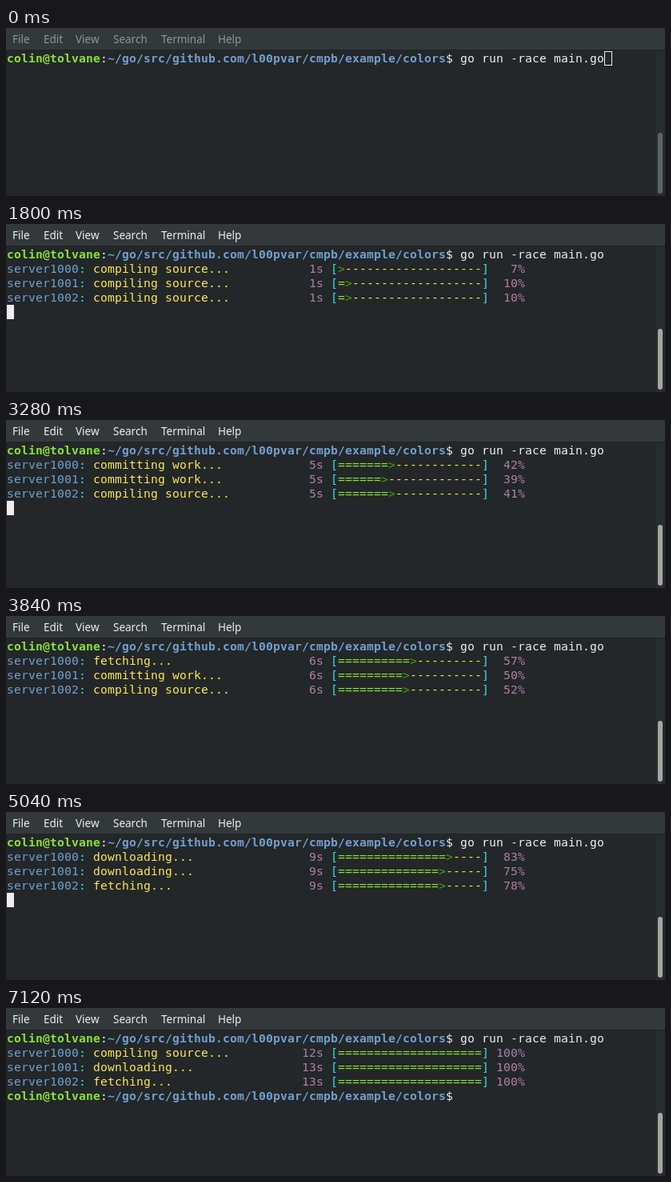
These frames come from a looping animation (824 px wide and 210 px high, 7.4 s). An HTML page with a canvas:

```html
<!DOCTYPE html>
<html lang="en">
<head>
<meta charset="utf-8">
<title>Terminal progress bars</title>
<style>
  html, body { margin: 0; width: 100%; height: 100%; overflow: hidden; background: #232729; }
  canvas { display: block; width: 824px; height: 210px; }
</style>
</head>
<body>
<canvas id="stage" width="824" height="210"></canvas>
<script>
const ctx = document.getElementById('stage').getContext('2d');
const LOOP = 7400, START = 1320, SPEED = 2.45;
const CELL = 9, LINE = 18, LEFT = 1, TOP = 29;
const MONO = '14.667px "DejaVu Sans Mono", monospace';

const C = {
  bg: '#232729', white: '#eeeeec', green: '#8ae234', darkGreen: '#4e9a06',
  blue: '#729fcf', cyan: '#34e2e2', yellow: '#fce94f', purple: '#ad7fa8'
};

const MENU = [['File', 8], ['Edit', 47], ['View', 87], ['Search', 134], ['Terminal', 194], ['Help', 265]];

const [FETCH, LOAD, BUILD, COMMIT] =
  ['fetching...', 'downloading...', 'compiling source...', 'committing work...'];

// Each bar passes through [time, percent, message]
const BARS = [
  [[1300, 0, BUILD], [1800, 7, BUILD], [2760, 29, COMMIT], [3840, 57, FETCH], [5040, 83, LOAD], [5840, 99, COMMIT], [6160, 100, BUILD]],
  [[1300, 0, BUILD], [1800, 10, BUILD], [2760, 30, COMMIT], [3840, 50, COMMIT], [5040, 75, LOAD], [5840, 87, COMMIT], [6480, 100, LOAD]],
  [[1300, 0, BUILD], [1800, 10, BUILD], [2760, 32, BUILD], [3840, 52, BUILD], [5040, 78, FETCH], [5840, 91, BUILD], [6480, 100, FETCH]]
];

function mix(a, b, k) {
  return `rgb(${a.map((v, i) => Math.round(v + (b[i] - v) * k)).join(',')})`;
}

// Writes on the character grid and returns the next column
function put(text, col, row, color, bold = false) {
  ctx.font = (bold ? 'bold ' : '') + MONO;
  ctx.fillStyle = color;
  for (const ch of text) {
    if (ch !== ' ') ctx.fillText(ch, LEFT + col * CELL, TOP + row * LINE + 14);
    col++;
  }
  return col;
}

function prompt(row) {
  let col = put('colin@tolvane', 0, row, C.green, true);
  col = put(':', col, row, C.white);
  col = put('~/go/src/github.com/l00pvar/cmpb/example/colors', col, row, C.blue, true);
  return put('$ ', col, row, C.white);
}

function cursor(col, row, hollow = false) {
  const x = LEFT + col * CELL, y = TOP + row * LINE;
  if (hollow) {
    ctx.strokeStyle = C.white;
    ctx.lineWidth = 1;
    ctx.strokeRect(x + 0.5, y + 0.5, CELL, LINE - 1);
  } else {
    ctx.fillStyle = C.white;
    ctx.fillRect(x, y, CELL, LINE);
  }
}

// Screen refreshes come in uneven beats
function lastRefresh(t) {
  if (t >= 5520) return Math.min(6480, t - (t - 5520) % 160);
  if (t >= 2760 && t < 2880) return 2760;
  const d = (t - (t < 2760 ? START : 2800)) % 240;
  return t - d + (d >= 80 ? 80 : 0);
}

function cursorOn(t) {
  if (t < 840) return true;
  if (t < 1160) return false;
  if (t < 1400 || t >= 5520) return true;
  const n = t < 2880 ? Math.min(5, Math.floor((t - 1400) / 240)) : Math.floor((t - 2880) / 240);
  return n % 2 === 1;
}

function barState(keys, t) {
  const end = keys[keys.length - 1];
  t = Math.min(t, end[0]);
  let i = 1;
  while (t > keys[i][0]) i++;
  const a = keys[i - 1], b = keys[i];
  const k = (t - a[0]) / (b[0] - a[0]);
  return {
    percent: Math.floor(a[1] + (b[1] - a[1]) * k + 1e-6),
    message: k < 0.5 ? a[2] : b[2],
    seconds: Math.round((t - START) / 1000 * SPEED)
  };
}

function drawBar(index, t) {
  const row = index + 1;
  const { percent, message, seconds } = barState(BARS[index], t);
  const filled = Math.floor(percent / 5);
  const full = percent === 100 ? 20 : Math.max(0, filled - 1);

  put(':', put('server' + (1000 + index), 0, row, C.blue), row, C.cyan);
  put(message, 12, row, C.yellow);
  put((seconds + 's').padStart(4), 40, row, C.purple);
  let col = put('[', 45, row, C.cyan);
  col = put('='.repeat(full), col, row, C.green);
  if (filled > full) col = put('>', col, row, C.darkGreen);
  col = put('-'.repeat(20 - filled), col, row, C.yellow);
  put(']', col, row, C.cyan);
  put((percent + '%').padStart(4), 68, row, C.purple);
}

function drawWindow(focus) {
  ctx.fillStyle = C.bg;
  ctx.fillRect(0, 0, 824, 210);

  ctx.fillStyle = '#33393b';
  ctx.fillRect(0, 0, 824, 27);
  ctx.fillStyle = '#1f2325';
  ctx.fillRect(0, 27, 824, 1);

  ctx.font = '13.5px "Noto Sans", sans-serif';
  ctx.fillStyle = mix([145, 148, 148], [238, 238, 236], focus);
  for (const [label, x] of MENU) ctx.fillText(label, x, 19);

  ctx.fillStyle = '#272c2e';
  ctx.fillRect(811, 28, 13, 182);
  ctx.fillStyle = '#1f2325';
  ctx.fillRect(811, 28, 1, 182);
  ctx.fillStyle = mix([94, 98, 99], [164, 166, 162], focus);
  ctx.beginPath();
  ctx.roundRect(815, 131, 6, 76, 3);
  ctx.fill();
}

function draw(t) {
  drawWindow(Math.max(0, Math.min(1, (t - 520) / 200)));
  const end = put('go run -race main.go', prompt(0), 0, C.white);

  if (t >= START) BARS.forEach((_, i) => drawBar(i, lastRefresh(t)));

  if (t >= 7120) prompt(4);
  else if (t < 560) cursor(end, 0, true);
  else if (cursorOn(t)) {
    if (t < 1160) cursor(end, 0);
    else cursor(0, t < START ? 1 : 4);
  }
}

const began = performance.now();
function tick() {
  draw((performance.now() - began) % LOOP);
  requestAnimationFrame(tick);
}
tick();
</script>
</body>
</html>
```
